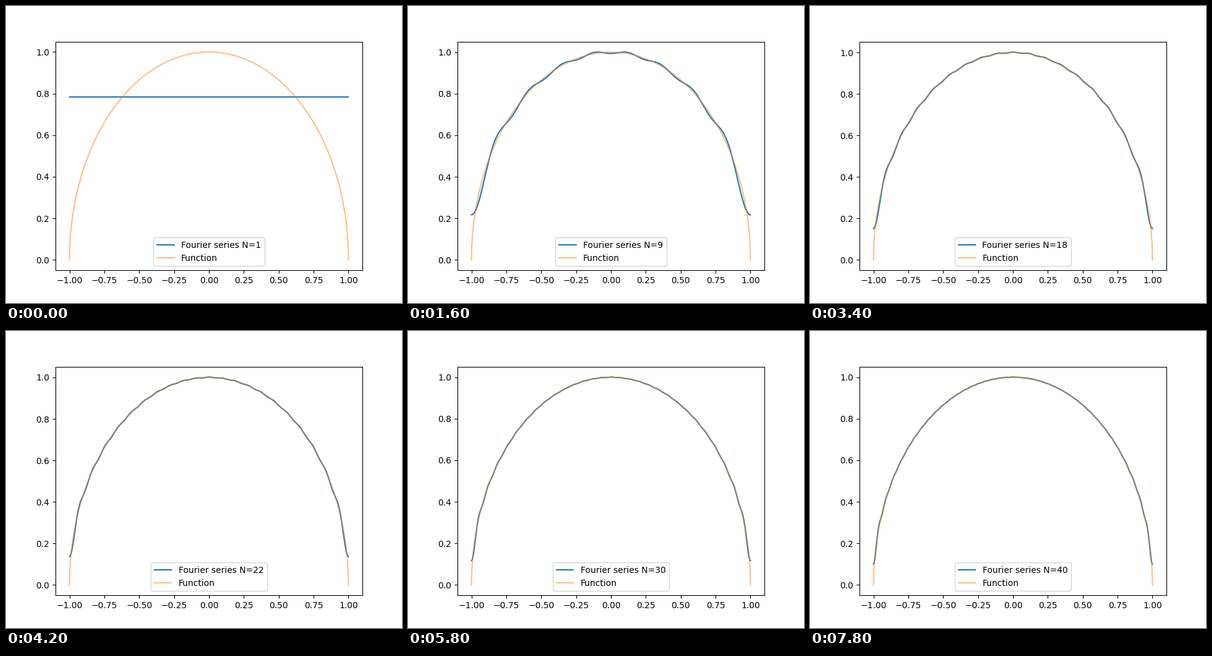
These frames come from a looping animation (640 by 480 pixels, 8 s). A matplotlib script:

```python
import numpy as np
import matplotlib.pyplot as plt
from matplotlib.animation import FuncAnimation

TERMS = 40
INTERVAL = 200  # ms

fig, ax = plt.subplots(figsize=(6.4, 4.8), dpi=100)

x = np.linspace(-1, 1, 1000)
semicircle = np.sqrt(1 - x**2)


def coefficient(n, samples=512):
    """Cosine coefficient of sqrt(1 - x^2) on [-1, 1], using x = sin(t)."""
    t = 2 * np.pi * np.arange(samples) / samples
    return np.pi * np.mean(np.cos(t)**2 * np.cos(n * np.pi * np.sin(t)))


orders = np.arange(TERMS)
coeffs = np.array([coefficient(n) for n in orders])
coeffs[0] /= 2
partial_sums = np.cumsum(
    coeffs[:, None] * np.cos(np.pi * orders[:, None] * x), axis=0)


def draw(i):
    ax.clear()
    ax.plot(x, partial_sums[i], label=f"Fourier series N={i + 1}")
    ax.plot(x, semicircle, alpha=0.5, label="Function")
    ax.legend(loc="lower center")
    return ax.lines


anim = FuncAnimation(fig, draw, frames=TERMS, interval=INTERVAL,
                     repeat=True, repeat_delay=0)
plt.show()
```
